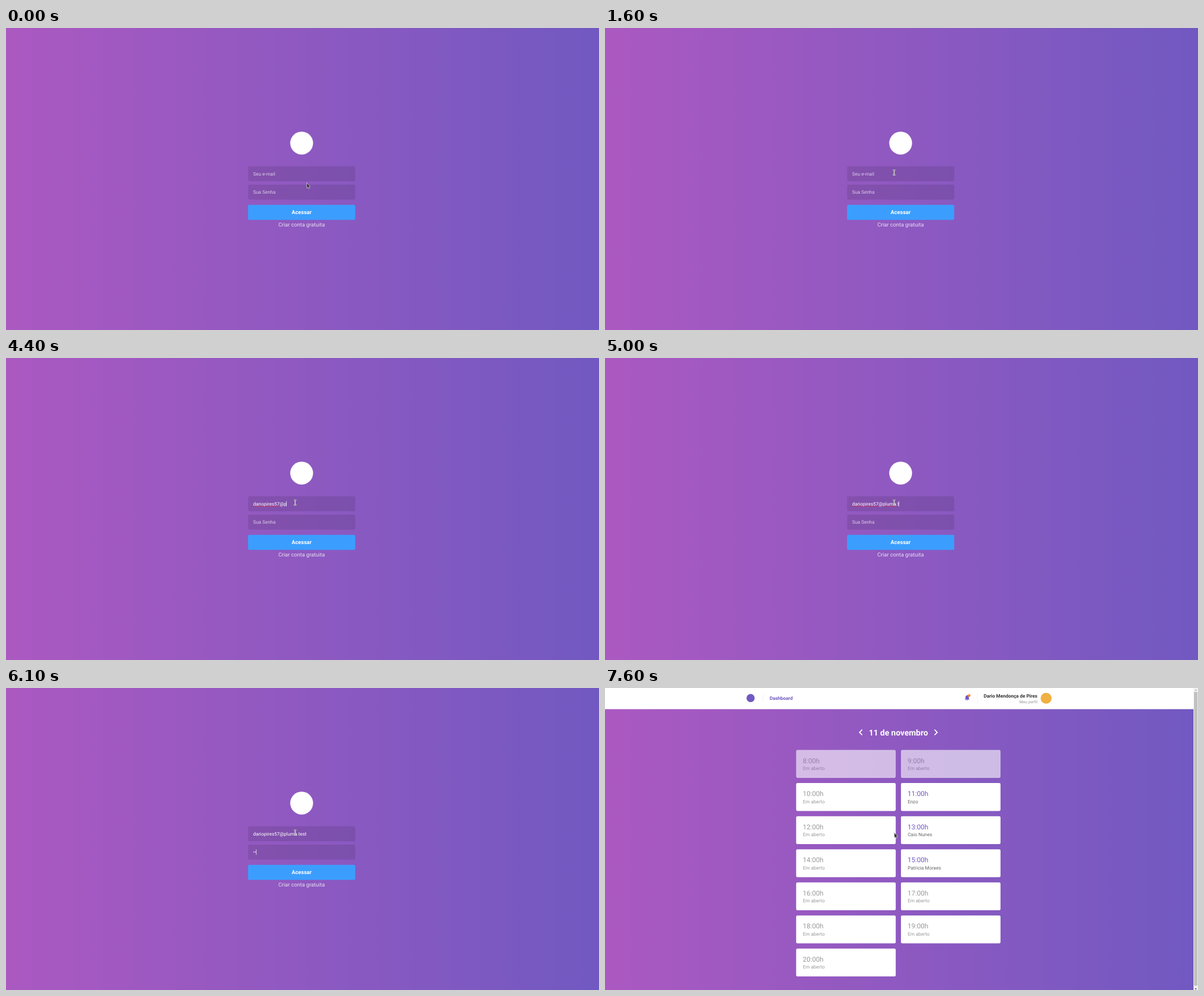
An HTML page for the animation above (8000 ms loop, 1048x534 px).

```html
<!DOCTYPE html>
<html lang="pt-BR">
<head>
<meta charset="utf-8">
<title>Login</title>
<style>
  html, body { margin: 0; width: 100%; height: 100%; overflow: hidden; background: #8e59c1; }
  svg { display: block; width: 1048px; height: 534px; }
  text { font-family: Roboto, sans-serif; font-size: 8.43px; white-space: pre; text-rendering: geometricPrecision; }
  .bold { font-weight: 700; }
  .hint { fill: #fff; fill-opacity: .7; }
  .value { fill: #fff; }
  .time { font-size: 12.04px; }
  [hidden] { display: none; }
</style>
</head>
<body>
<svg viewBox="0 0 1048 534">
  <defs>
    <linearGradient id="bg">
      <stop offset="0" stop-color="#ab59c1"/>
      <stop offset="1" stop-color="#7159c1"/>
    </linearGradient>
    <path id="arrow" d="M.4 .4L.7 10L2.6 8.6L4 11.3L5.6 10.5L4.5 7.8L6.5 7.2Z"
      fill="#333" stroke="#e8e8e8" stroke-width=".7" stroke-linejoin="round"/>
    <path id="beam" d="M-2.2 -4.2H2.2M0 -4.2V4.2M-2.2 4.2H2.2"/>
  </defs>

  <g id="login">
    <rect width="1048" height="534" fill="url(#bg)"/>
    <circle cx="522.5" cy="203.5" r="20.2" fill="#fff"/>
    <g fill-opacity=".1">
      <rect x="427.8" y="244.5" width="189.4" height="26.5" rx="2.4"/>
      <rect x="427.8" y="277" width="189.4" height="26.5" rx="2.4"/>
    </g>
    <text id="email" x="436.7" y="260.6"></text>
    <text id="pass" x="436.7" y="293.1"></text>
    <g id="squiggles" stroke="#f0322f" stroke-width=".9" stroke-dasharray="1.2 .5"></g>
    <rect id="caret" width=".7" height="9.7" fill="#fff"/>
    <rect x="427.8" y="312.8" width="189.4" height="26.5" rx="2.4" fill="#3b9eff"/>
    <g text-anchor="middle" fill="#fff">
      <text class="bold" x="522.4" y="329.3" style="font-size:9.63px">Acessar</text>
      <text x="522.3" y="350.6" style="font-size:9.63px" fill-opacity=".8">Criar conta gratuita</text>
    </g>
    <use id="pointer" href="#arrow" x="531" y="273"/>
    <g id="ibeam" transform="translate(511 255.6)" fill="none">
      <use href="#beam" stroke="#eee" stroke-width="1.9"/>
      <use href="#beam" stroke="#555" stroke-width=".6"/>
    </g>
  </g>

  <g id="dash" hidden>
    <rect width="1040" height="534" fill="url(#bg)"/>
    <rect width="1040" height="37.4" fill="#fff"/>
    <circle cx="257.3" cy="17.8" r="7.2" fill="#7159c1"/>
    <path d="M279.3 11V25M658.3 8.5V27.8" stroke="#eee" stroke-width=".7"/>
    <text class="bold" x="291" y="21" fill="#7159c1">Dashboard</text>
    <path transform="translate(634 11) scale(.5)" fill="#7159c1" d="M12 22c1.1 0 2-.9 2-2h-4c0 1.1.89 2 2 2zm6-6v-5c0-3.07-1.64-5.64-4.5-6.32V4c0-.83-.67-1.5-1.5-1.5s-1.5.67-1.5 1.5v.68C7.63 5.36 6 7.92 6 11v5l-2 2v1h16v-1l-2-2z"/>
    <circle cx="643.5" cy="13.4" r="2.4" fill="#ff892e"/>
    <g text-anchor="end">
      <text class="bold" x="764.2" y="16.7" fill="#333">Dario Mendonça de Pires</text>
      <text x="764.2" y="26.5" fill="#999" style="font-size:7.22px">Meu perfil</text>
    </g>
    <circle cx="779.6" cy="18.1" r="9.7" fill="#f0b042"/>
    <g fill="#fff">
      <path transform="translate(441.3 67.6) scale(.903)" d="M15.41 7.41L14 6l-6 6 6 6 1.41-1.41L10.83 12z"/>
      <path transform="translate(574 67.6) scale(.903)" d="M10 6L8.59 7.41 13.17 12l-4.58 4.59L10 18l6-6z"/>
      <text class="bold" x="518.5" y="84.2" text-anchor="middle" style="font-size:14.45px">11 de novembro</text>
    </g>
    <g id="slots"></g>
    <rect x="1040" width="8" height="534" fill="#f1f1f1"/>
    <rect x="1041" y="7" width="6" height="519.5" fill="#c1c1c1"/>
    <path d="M1042 4.6L1044 2.4L1046 4.6Z" fill="#a3a3a3"/>
    <path d="M1042 531L1044 533.2L1046 531Z" fill="#505050"/>
    <use href="#arrow" x="510.6" y="255"/>
  </g>
</svg>
<script>
const LOOP = 8000;
const EMAIL = "dariopires57@pluma.test";
const USER_LEN = EMAIL.indexOf("@");
const HOST = [USER_LEN + 1, EMAIL.indexOf(".")];
const LEFT = 436.7;

// each step changes only the listed parts of the state
const steps = [
  { at: 0, email: "", dots: 0, caret: "", ibeam: false, marks: [], dash: false },
  { at: 200, caret: "email", ibeam: true },
  { at: 1000, email: "ad" },
  { at: 1400, email: "a" },
  { at: 1600, email: "", caret: "" },
  { at: 2200, caret: "email" },
  { at: 2400, email: EMAIL.slice(0, 1) },
  { at: 2500, email: EMAIL.slice(0, 2) },
  { at: 4400, email: EMAIL.slice(0, 14), marks: [[0, USER_LEN]] },
  { at: 4700, email: EMAIL.slice(0, 17) },
  { at: 5000, email: EMAIL.slice(0, 20), marks: [[0, USER_LEN], HOST] },
  { at: 5400, email: EMAIL, caret: "pass", marks: [] },
  { at: 6100, dots: 2 },
  { at: 6500, dots: 3 },
  { at: 6800, dots: 4 },
  { at: 7200, dots: 5 },
  { at: 7600, dash: true }
];

const $ = id => document.getElementById(id);
const show = (el, on) => el.toggleAttribute("hidden", !on);

function add(parent, tag, attrs, text = "") {
  const el = document.createElementNS("http://www.w3.org/2000/svg", tag);
  for (const key in attrs) el.setAttribute(key, attrs[key]);
  el.textContent = text;
  parent.append(el);
  return el;
}

function buildSlots() {
  const booked = { 11: "Enzo", 13: "Caio Nunes", 15: "Patricia Moraes" };
  for (let hour = 8; hour <= 20; hour++) {
    const i = hour - 8, name = booked[hour];
    const x = 337.8 + (i % 2) * 185.2, y = 109.6 + (i >> 1) * 58.52;
    const card = add($("slots"), "g", {
      transform: `translate(${x} ${y})`, opacity: hour < 10 ? .6 : 1
    });
    add(card, "rect", { width: 176, height: 49.4, rx: 2.4, fill: "#fff" });
    add(card, "text", { class: "time", x: 11.8, y: 23.1, fill: name ? "#7159c1" : "#999" }, `${hour}:00h`);
    add(card, "text", { x: 11.9, y: 35.4, fill: name ? "#666" : "#999" }, name || "Em aberto");
  }
}

function setField(el, value, hint) {
  el.textContent = value || hint;
  el.setAttribute("class", value ? "value" : "hint");
}

const textEnd = (el, count) => LEFT + (count ? el.getSubStringLength(0, count) : 0);

function render(s) {
  show($("login"), !s.dash);
  show($("dash"), s.dash);
  if (s.dash) return;
  const email = $("email"), pass = $("pass");
  setField(email, s.email, "Seu e-mail");
  setField(pass, "•".repeat(s.dots), "Sua Senha");
  show($("pointer"), !s.ibeam);
  show($("ibeam"), s.ibeam);
  show($("caret"), s.caret);
  if (s.caret) {
    const onEmail = s.caret === "email";
    const x = onEmail ? textEnd(email, s.email.length) : textEnd(pass, s.dots);
    $("caret").setAttribute("x", x - .6);
    $("caret").setAttribute("y", onEmail ? 252.9 : 285.4);
  }
  $("squiggles").replaceChildren();
  for (const [from, to] of s.marks) {
    add($("squiggles"), "line", { x1: textEnd(email, from), x2: textEnd(email, to), y1: 262.1, y2: 262.1 });
  }
}

buildSlots();
const start = performance.now();
let shown = -1;

function tick() {
  const t = (performance.now() - start) % LOOP;
  const n = steps.filter(s => s.at <= t).length;
  if (n !== shown) {
    shown = n;
    render(Object.assign({}, ...steps.slice(0, n)));
  }
  requestAnimationFrame(tick);
}
tick();
</script>
</body>
</html>
```
